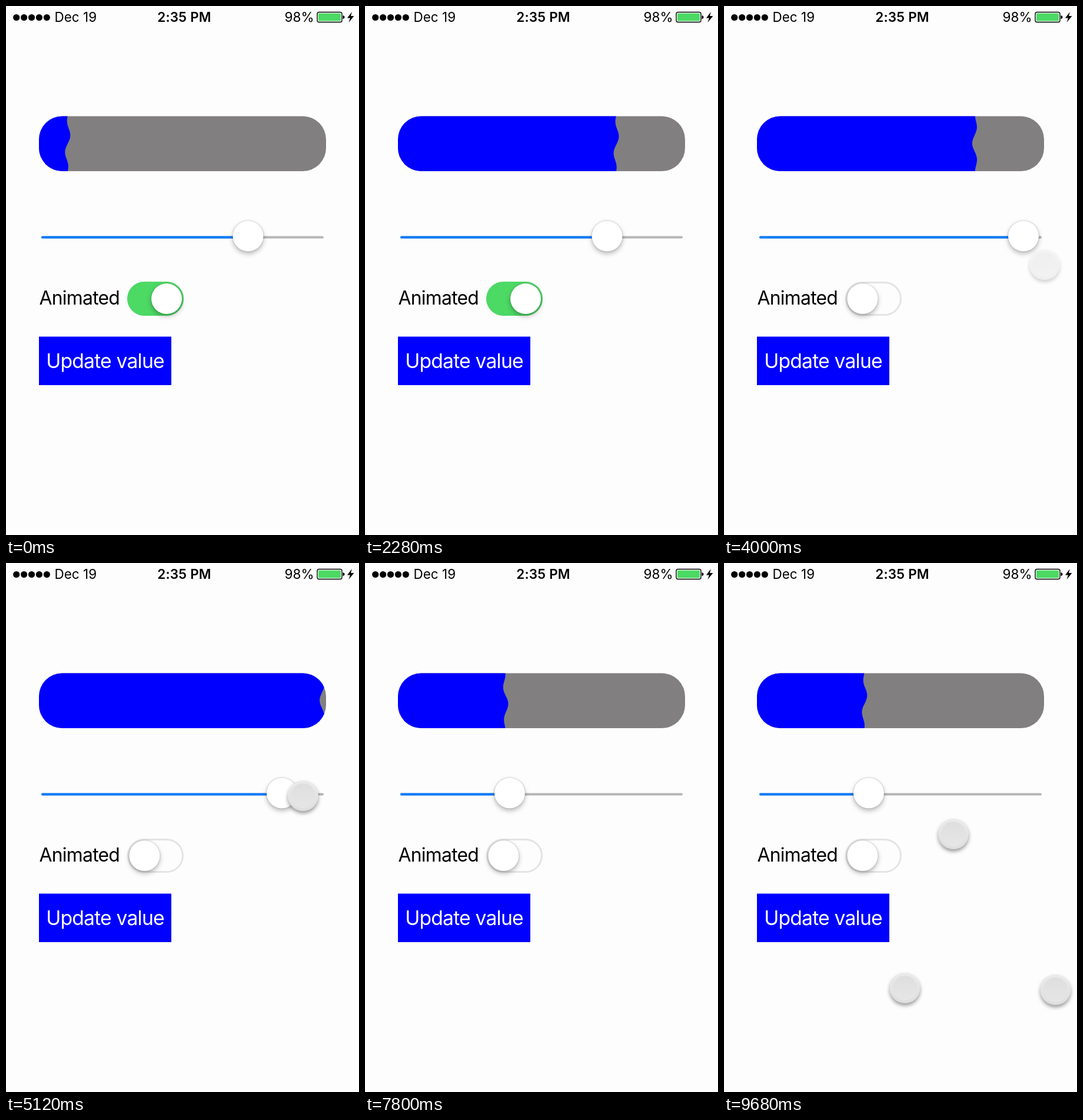
Animation, 600 px wide and 900 px high, one loop 9.72 s. Source, as an HTML page:

```html
<!DOCTYPE html>
<html lang="en">
<head>
<meta charset="utf-8">
<title>Wave progress</title>
<style>
  html, body { margin: 0; width: 100%; height: 100%; overflow: hidden; background: #fefdfe; }
  svg { display: block; width: 600px; height: 900px; }
  text { font-family: Inter, Roboto, sans-serif; font-optical-sizing: none; }
  .status { font-size: 22.5px; }
  .knob { filter: drop-shadow(0 4px 4px rgba(0,0,0,.22)) drop-shadow(0 0 1px rgba(0,0,0,.3)); }
  .touch { filter: drop-shadow(0 4px 3px rgba(0,0,0,.38)); }
</style>
</head>
<body>
<svg viewBox="0 0 600 900">
  <defs>
    <clipPath id="pill"><rect x="56" y="187.5" width="488" height="93.5" rx="39.5"/></clipPath>
    <linearGradient id="rim" x2="0" y2="1">
      <stop stop-color="#ebebeb"/><stop offset="1" stop-color="#dedede"/>
    </linearGradient>
    <linearGradient id="soft" x2="0" y2="1">
      <stop stop-color="#dedede"/><stop offset="1" stop-color="#e6e6e6"/>
    </linearGradient>
    <linearGradient id="dark" x2="0" y2="1">
      <stop stop-color="#bcbcbc"/><stop offset="1" stop-color="#e8e8e8"/>
    </linearGradient>
  </defs>
  <rect width="600" height="900" fill="#fefdfe"/>

  <g id="dots"></g>
  <text class="status" x="82.5" y="27">Dec 19</text>
  <text class="status" x="303" y="27" text-anchor="middle" font-weight="600" letter-spacing=".2">2:35 PM</text>
  <text class="status" x="523.5" y="27" text-anchor="end">98%</text>
  <rect x="529" y="10.5" width="42" height="17" rx="3" fill="none" stroke="#000" stroke-width="1.4"/>
  <rect x="531" y="12.5" width="38" height="13" rx="1" fill="#4cd964"/>
  <path d="M572.5 16 q3 .5 3 3 t-3 3z"/>
  <path d="M588 10 L580 20.5 H585 L582.5 28 L591.5 17 H586z"/>

  <g clip-path="url(#pill)">
    <rect x="56" y="187" width="488" height="95" fill="#827f81"/>
    <path id="fill" fill="#00f"/>
  </g>

  <g stroke-width="4" stroke-linecap="round">
    <path d="M62 393.5H538" stroke="#b7b6b7"/>
    <path id="track" stroke="#057aff"/>
  </g>
  <circle id="thumb" class="knob" cy="391.5" r="26" fill="#fff"/>

  <text x="56.5" y="508" font-size="31.9" letter-spacing="-.75">Animated</text>
  <rect x="207.5" y="470.5" width="93" height="55" rx="27.5" fill="#fefdfe" stroke="#e4e3e5" stroke-width="3"/>
  <rect id="on" x="206" y="469" width="96" height="58" rx="29" fill="#4cd964"/>
  <circle id="toggle" class="knob" cy="498" r="26" fill="#fff"/>

  <rect x="56" y="562.5" width="225" height="82.5" fill="#00f"/>
  <text x="168.5" y="616" text-anchor="middle" fill="#fff" font-size="33.75" letter-spacing="-.85">Update value</text>
  <g id="touches"></g>
</svg>
<script>
const LOOP = 9720, TOP = 187, H = 94.5;
const $ = id => document.getElementById(id);
const clamp = v => Math.max(0, Math.min(1, v));
const ease = v => v * v * (3 - 2 * v);
const span = (t, a, b) => clamp((t - a) / (b - a));

function make(tag, attrs, parent) {
  const el = document.createElementNS('http://www.w3.org/2000/svg', tag);
  set(el, attrs);
  return parent.appendChild(el);
}
function set(el, attrs) {
  for (const k in attrs) el.setAttribute(k, attrs[k]);
}

// Piecewise linear value through [time, value] pairs
function track(keys, t) {
  if (t <= keys[0][0]) return keys[0][1];
  for (let i = 1; i < keys.length; i++) {
    const [a, u] = keys[i - 1], [b, v] = keys[i];
    if (t <= b) return u + (v - u) * (t - a) / (b - a);
  }
  return keys[keys.length - 1][1];
}

const phaseKeys = [[0, 3.14], [2280, -9.63], [4000, -20.35], [5120, -26.64],
                   [6200, -33.29], [7800, -43], [9680, -54]];
const pull = [[4960, 509], [5040, 499], [5120, 469.5], [5260, 385], [5400, 292], [5500, 256], [5580, 246]];

function thumbX(t) {
  return t < 4900 ? 411.5 + 97.5 * ease(span(t, 3240, 3780)) : track(pull, t);
}
function level(t) {
  if (t >= 6170) return .374;
  if (t >= 4540) return .988;
  return .1 + .66 * ease(span(t, 850, 1650));
}

const still = (x, y) => () => [x, y];
const touches = [
  { from: 600, to: 860, at: still(215, 600), tap: true },
  { from: 2480, to: 2640, at: still(258, 500), tap: true },
  { from: 3100, to: 3840, at: t => [thumbX(t) + 36, 400 + 40 * ease(span(t, 3240, 3800))] },
  { from: 4400, to: 4560, at: still(218, 588), tap: true },
  { from: 4840, to: 5680, at: t => [thumbX(t) + 36, 396] },
  { from: 6060, to: 6230, at: still(222, 617.5), tap: true },
  { from: 7940, to: LOOP, at: still(390, 461) },
  { from: 7940, to: LOOP, at: still(307.5, 723) },
  { from: 7940, to: LOOP, at: still(563.5, 726) }
];
for (const p of touches) {
  p.el = make('g', { class: 'touch' }, $('touches'));
  make('circle', { r: 26, fill: 'url(#rim)' }, p.el);
  make('circle', { r: 21, fill: p.tap ? 'url(#dark)' : 'url(#soft)' }, p.el);
}
for (let i = 0; i < 5; i++) make('circle', { cx: 17.7 + 12.9 * i, cy: 19.5, r: 5.6 }, $('dots'));

function drawFill(t) {
  const x0 = 56 + 488 * level(t), phase = track(phaseKeys, t);
  let d = `M50 ${TOP}`;
  for (let i = 0; i <= 48; i++) {
    const u = i / 48, env = 1 - (2 * u - 1) ** 2;
    const x = x0 + 5 * env * Math.sin(3 * Math.PI * (u - .5) + phase);
    d += `L${x.toFixed(2)} ${(TOP + H * u).toFixed(2)}`;
  }
  $('fill').setAttribute('d', d + `L50 ${TOP + H}Z`);
}

function drawTouch(p, t) {
  const alpha = span(t, p.from, p.from + 90) * (1 - span(t, p.to, p.to + 290));
  const grow = p.tap ? .1 : .35;
  const scale = (p.tap ? .96 : 1) + grow * (1 - ease(span(t, p.from, p.from + 180)));
  const [x, y] = p.at(t);
  set(p.el, {
    transform: `translate(${x} ${y}) scale(${scale})`,
    opacity: alpha,
    visibility: alpha > 0 ? 'visible' : 'hidden'
  });
}

function draw(t) {
  drawFill(t);
  const x = thumbX(t), off = ease(span(t, 2640, 2900));
  $('track').setAttribute('d', `M62 393.5H${x}`);
  $('thumb').setAttribute('cx', x);
  $('toggle').setAttribute('cx', 273 - 37.5 * off);
  $('on').setAttribute('opacity', 1 - off);
  for (const p of touches) drawTouch(p, t);
}

const start = performance.now();
function tick() {
  draw((performance.now() - start) % LOOP);
  requestAnimationFrame(tick);
}
tick();
</script>
</body>
</html>
```
